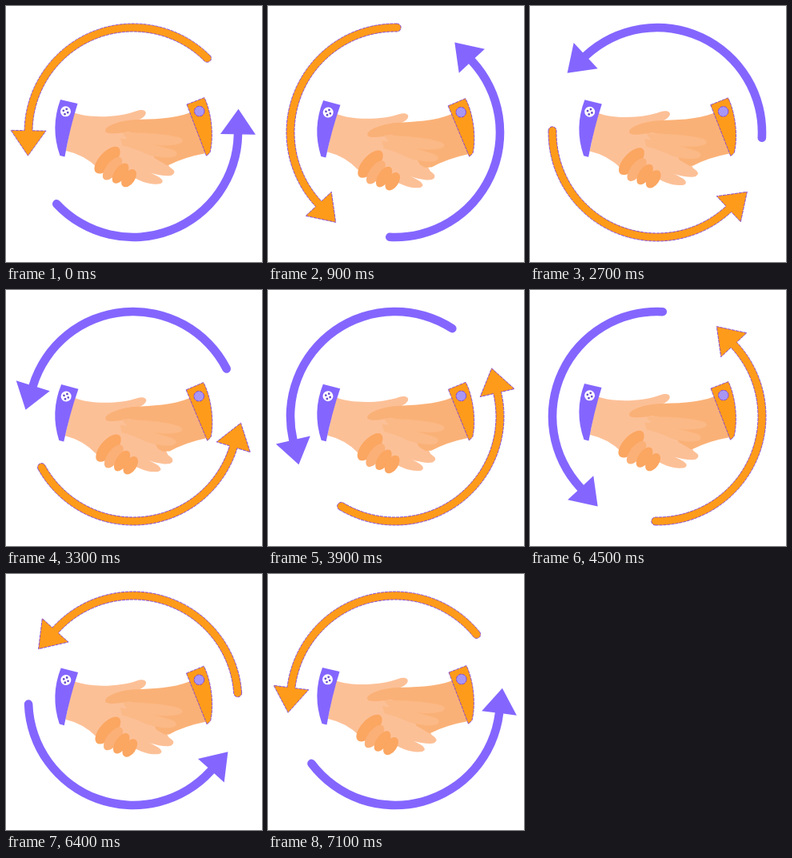
An HTML page that plays this animation: 320x320 px, repeating every 7200 ms.

```html
<!DOCTYPE html>
<html lang="en">
<head>
<meta charset="utf-8">
<title>Handshake</title>
<style>
html, body { margin: 0; width: 100%; height: 100%; overflow: hidden; background: #fff; }
svg { display: block; width: 100vw; height: 100vh; }
.purple { fill: #8466ff; }
.orange { fill: #ff9b1a; }
.edge { fill: none; stroke: #6a30f0; stroke-width: .75; stroke-dasharray: 4 1; }
.left { fill: #fcc097; }
.right { fill: #fab177; }
.finger { fill: #fbb987; }
.knuckle { fill: #fba661; }
.back { fill: #fbb077; }
</style>
</head>
<body>
<svg viewBox="0 0 320 320">
  <g id="arrows"></g>
  <g class="armL">
    <path class="left" d="M84 133C105 141 142 139 163 131C171 128 177 131 174 136Q171 141 160 144L185 165L205 202Q208 210 199 210L160 206L114 202Q98 186 75 181Z"/>
  </g>
  <g class="armR">
    <path class="right" d="M231 133C207 142 183 141 160 142C141 143 123 150 124 156C125 161 141 159 153 157L172 161L190 199L203 199Q222 189 250 184Z"/>
  </g>
  <g class="armL">
    <path class="finger" d="M145 158C170 158 198 159 216 164Q224 167 219 171C206 177 176 173 153 168Z"/>
    <path class="finger" d="M143 165C168 168 194 175 210 180Q217 184 211 188C197 192 171 185 146 176Z"/>
    <path class="left" d="M131 172C160 175 184 188 206 202Q214 207 208 211C200 215 174 207 151 200Z"/>
    <path class="left" d="M149 197C167 202 180 207 192 214Q199 219 193 222C180 224 167 219 151 209Z"/>
  </g>
  <g class="armR">
    <ellipse class="knuckle" cx="126.5" cy="192.5" rx="21" ry="10" transform="rotate(-47 126.5 192.5)"/>
    <ellipse class="back" cx="133" cy="203" rx="17" ry="8" transform="rotate(-52 133 203)"/>
    <ellipse class="knuckle" cx="143" cy="209" rx="14.5" ry="7.5" transform="rotate(-55 143 209)"/>
    <ellipse class="knuckle" cx="153.5" cy="215" rx="12.5" ry="7.5" transform="rotate(-55 153.5 215)"/>
  </g>
  <g class="armL">
    <path class="purple" d="M68 117L89.500 122Q80 152 73.500 188.500L67.500 187Q55 152 68 117Z"/>
    <circle cx="74.500" cy="131.800" r="6.500" fill="#fff"/>
    <g fill="#6a4cc8">
      <circle cx="71.800" cy="130.800" r="1.400"/><circle cx="75.700" cy="128.800" r="1.400"/>
      <circle cx="77.200" cy="133.100" r="1.400"/><circle cx="73.500" cy="135.100" r="1.400"/>
    </g>
  </g>
  <g class="armR">
    <g id="cuff"></g>
    <circle cx="241.800" cy="131.500" r="6.300" fill="#a896f5"/>
    <circle class="edge" cx="241.800" cy="131.500" r="6.300"/>
  </g>
</svg>
<script>
const LOOP = 7200, STEP = 100, CX = 159, CY = 158, R = 131;
const $ = id => document.getElementById(id);

// Counter-clockwise polar position around the ring's centre
function at(deg, r, forward = 0) {
  const a = deg * Math.PI / 180, c = Math.cos(a), s = Math.sin(a);
  return (CX + r * c - forward * s).toFixed(2) + ' ' + (CY - r * s - forward * c).toFixed(2);
}

function arrowPath(tail, head, half) {
  const arc = (r, sweep, to) => `A${r} ${r} 0 0 ${sweep} ${to}`;
  const outer = R + half, inner = R - half;
  return `M${at(tail, outer)}` + arc(outer, 0, at(head, outer)) +
    `L${at(head, R + 22)}L${at(head, R, 31.5)}L${at(head, R - 22)}L${at(head, inner)}` +
    arc(inner, 1, at(tail, inner)) + arc(half, 0, at(tail, outer)) + 'Z';
}

const outlined = d => `<path class="orange" d="${d}"/><path class="edge" d="${d}"/>`;

$('arrows').innerHTML =
  `<path class="purple" d="${arrowPath(223, 359, 5.3)}"/>` + outlined(arrowPath(45, 179, 5));
$('cuff').innerHTML = outlined('M226 123L248 114.500C257 133 260 163 255 183L250.500 187.500Z');

const armsL = document.querySelectorAll('.armL');
const armsR = document.querySelectorAll('.armR');

function draw(ms) {
  const n = Math.floor(ms % LOOP / STEP);
  const turn = n ? n * 5 - 1 : 0;
  $('arrows').setAttribute('transform', `rotate(${-turn} ${CX} ${CY})`);

  // The hands dip three times per loop
  const dip = 1 + Math.cos((n * STEP - 1050) / 2400 * 2 * Math.PI);
  armsL.forEach(g => g.setAttribute('transform', `rotate(${dip} 40 152)`));
  armsR.forEach(g => g.setAttribute('transform', `rotate(${-dip} 280 150)`));
}

const start = performance.now();
function tick() {
  draw(performance.now() - start);
  requestAnimationFrame(tick);
}
draw(0);
requestAnimationFrame(tick);
</script>
</body>
</html>
```
